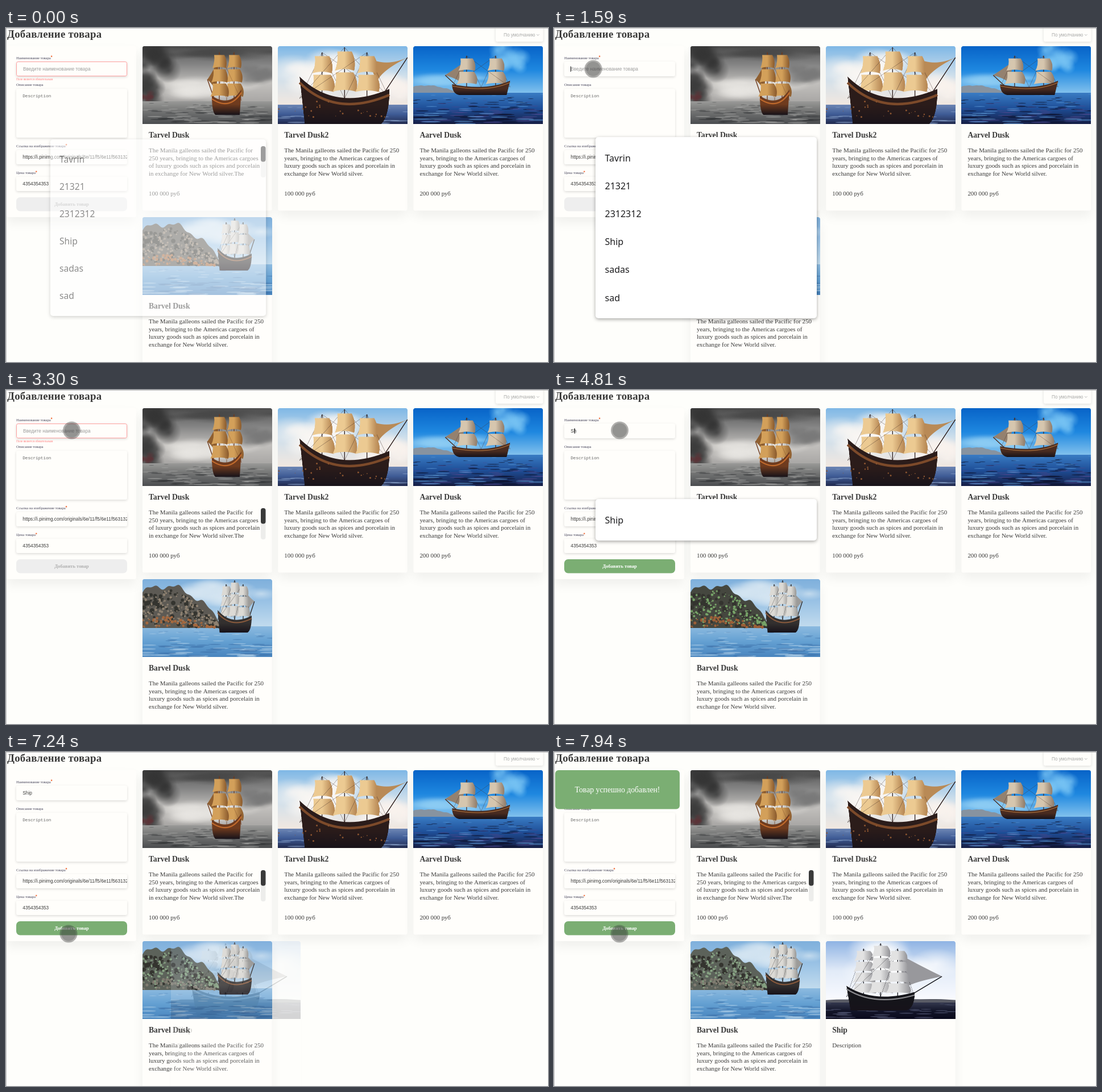
An HTML page with a canvas that plays this animation: 953 px wide and 588 px high, repeating every 8 s.

```html
<!DOCTYPE html>
<html lang="ru">
<head>
<meta charset="utf-8">
<title>Добавление товара</title>
<style>
html, body { margin: 0; width: 100%; height: 100%; overflow: hidden; background: #fefefb; }
canvas { display: block; }
</style>
</head>
<body>
<canvas id="stage" width="953" height="588"></canvas>
<script>
const W = 953, H = 588, LOOP = 8000, STEP = 100.5;
const SERIF = '"Liberation Serif", "Times New Roman", serif';
const SANS = '"Liberation Sans", Arial, sans-serif';
const MONO = '"Liberation Mono", monospace';
const UI = '"Noto Sans", "Open Sans", sans-serif';
const INK = '#3a3a3a', GREEN = '#7bae73', PAPER = '#fffefb';
const IMG_W = 227.5, IMG_H = 136.5;

const stage = document.getElementById('stage').getContext('2d');
const scratch = makeCanvas(W, H);
let g = stage;

const clamp = v => Math.max(0, Math.min(1, v));
const smooth = v => v * v * (3 - 2 * v);

// CSS "ease": cubic-bezier(.25, .1, .25, 1)
function ease(x) {
  if (x <= 0 || x >= 1) return clamp(x);
  let a = 0, b = 1, u = 0;
  for (let i = 0; i < 20; i++) {
    u = (a + b) / 2;
    const bx = .75 * u * (1 - u) ** 2 + .75 * u * u * (1 - u) + u ** 3;
    if (bx < x) a = u; else b = u;
  }
  return .3 * u * (1 - u) ** 2 + 3 * u * u * (1 - u) + u ** 3;
}

function random(seed) {
  return () => (seed = (seed * 16807) % 2147483647) / 2147483647;
}

// ---------- drawing helpers ----------
function makeCanvas(w, h) {
  const canvas = document.createElement('canvas');
  canvas.width = w;
  canvas.height = h;
  return canvas;
}

function drawInto(canvas, paint) {
  const outer = g;
  g = canvas.getContext('2d');
  g.save();
  g.clearRect(0, 0, canvas.width, canvas.height);
  paint();
  g.restore();
  g = outer;
}

// Fades a group of shapes as one.
function layer(alpha, paint) {
  if (alpha <= 0) return;
  drawInto(scratch, paint);
  g.globalAlpha = alpha;
  g.drawImage(scratch, 0, 0);
  g.globalAlpha = 1;
}

function text(s, x, y, font, color, spacing = 0, align = 'left') {
  g.font = font;
  g.fillStyle = color;
  g.letterSpacing = spacing + 'px';
  g.textAlign = align;
  g.fillText(s, x, y);
}

function box(x, y, w, h, r, color, shadow) {
  g.save();
  if (shadow) {
    [g.shadowOffsetY, g.shadowBlur] = shadow;
    g.shadowColor = `rgba(0,0,0,${shadow[2]})`;
  }
  g.fillStyle = color;
  g.beginPath();
  g.roundRect(x, y, w, h, r);
  g.fill();
  g.restore();
}

function disc(x, y, r, color) {
  g.fillStyle = color;
  g.beginPath();
  g.arc(x, y, r, 0, 7);
  g.fill();
}

function line(color, width, x0, y0, x1, y1) {
  g.strokeStyle = color;
  g.lineWidth = width;
  g.beginPath();
  g.moveTo(x0, y0);
  g.lineTo(x1, y1);
  g.stroke();
}

function gradient(x0, y0, x1, y1, colors) {
  const grad = g.createLinearGradient(x0, y0, x1, y1);
  colors.forEach((c, i) => grad.addColorStop(i / (colors.length - 1), c));
  return grad;
}

// ---------- pictures ----------
function band(y0, y1, ...colors) {
  g.fillStyle = gradient(0, y0, 0, y1, colors);
  g.fillRect(0, y0, IMG_W + 1, y1 - y0);
}

// Soft, flat puffs scattered around a point.
function cloud(rgb, x, y, rx, ry, seed) {
  const rnd = random(seed);
  for (let i = 0; i < 14; i++) {
    const px = x + (rnd() + rnd() - 1) * rx, py = y + (rnd() + rnd() - 1) * ry;
    const r = ry * (.4 + rnd() * .5);
    g.save();
    g.translate(px, py);
    g.scale(Math.max(1, rx / ry * .8), 1);
    const grad = g.createRadialGradient(0, 0, 0, 0, 0, r);
    grad.addColorStop(0, `rgba(${rgb},.7)`);
    grad.addColorStop(1, `rgba(${rgb},0)`);
    disc(0, 0, r, grad);
    g.restore();
  }
}

function waves(color, top, count, seed) {
  const rnd = random(seed);
  g.fillStyle = color;
  for (let i = 0; i < count; i++) {
    const depth = rnd(), x = rnd() * IMG_W;
    g.beginPath();
    g.ellipse(x, top + depth * (IMG_H - top), 4 + depth * 14, .4 + depth, 0, 0, 7);
    g.fill();
  }
}

const ridge = (u, wobble) => Math.sin(Math.PI * (.32 + .68 * u)) + wobble * Math.sin(u * 19) + wobble * .5 * Math.sin(u * 47);

function hill(color, width, base, height, wobble = .04) {
  g.fillStyle = color;
  g.beginPath();
  g.moveTo(0, base);
  for (let u = 0; u <= 1; u += .02) g.lineTo(u * width, base - height * Math.max(0, ridge(u, wobble)));
  g.lineTo(width, base);
  g.fill();
}

function foliage(color, count, width, base, height, size, seed) {
  const rnd = random(seed);
  for (let i = 0; i < count; i++) {
    const u = rnd();
    disc(u * width, base - rnd() * height * ridge(u, 0), size * (.4 + rnd()), color);
  }
}

function sail(x, y, w, h, belly) {
  g.beginPath();
  g.moveTo(x - w * .75, y);
  g.lineTo(x + w * .75, y);
  g.quadraticCurveTo(x + w + belly, y + h * .5, x + w, y + h);
  g.quadraticCurveTo(x, y + h * .82, x - w, y + h);
  g.quadraticCurveTo(x - w * .75 + belly * .5, y + h * .5, x - w * .75, y);
  g.fill();
}

// Stern at x0, bow at x1; the bow may point either way.
function ship(x0, x1, keel, deck, top, { masts, tiers, wide, hull, trim, lit, shade, jib = .3 }) {
  const len = x1 - x0, side = keel - deck, gap = Math.abs(len) * .5 / (masts - 1);
  const at = u => x0 + len * u;
  const tip = [at(1 + jib), deck - side * 1.5];
  const sheer = dy => {
    g.moveTo(at(0), deck - side * .8 + dy);
    g.quadraticCurveTo(at(.4), deck + side * .5 + dy, at(1), deck - side * .35 + dy);
  };
  const mastTop = i => top + (deck - top) * .1 * Math.abs(i - (masts - 1) / 2);
  const mastAt = i => at(.25 + .5 * i / (masts - 1));
  const front = masts - 1;

  line(hull, 1.4, at(.9), deck, ...tip);
  g.fillStyle = shade;
  g.beginPath();
  g.moveTo(mastAt(front), mastTop(front) + 8);
  g.quadraticCurveTo(at(.85 + jib * .5), top + (deck - top) * .4, ...tip);
  g.quadraticCurveTo(at(.9), deck - side, at(.86), deck - side * .6);
  g.fill();

  for (let i = 0; i < masts; i++) {
    const x = mastAt(i), y0 = mastTop(i);
    const rise = (deck - side * .15 - y0) / (tiers + .25);
    line(hull, 1.3, x, y0, x, deck + side * .3);
    for (const u of [0, .5, 1]) line(hull, .35, x, y0, at(u), deck);
    for (let j = 0; j < tiers; j++) {
      const w = gap * wide * (.65 + .35 * (j + 1) / tiers);
      g.fillStyle = gradient(x - w, 0, x + w, 0, [lit, lit, shade]);
      sail(x, y0 + rise * (j + .2), w, rise * .92, w * .25);
    }
  }

  g.fillStyle = gradient(0, deck - side * .5, 0, keel, [hull, hull, '#17131a']);
  g.beginPath();
  sheer(0);
  g.quadraticCurveTo(at(1), keel - side * .2, at(.88), keel);
  g.lineTo(at(.06), keel);
  g.fill();
  g.strokeStyle = trim;
  g.lineWidth = Math.max(1, side * .09);
  g.beginPath();
  sheer(side * .22);
  g.stroke();
}

function stormShip() {
  band(0, 98, '#555', '#858585', '#c2c0bd', '#a9a7a5');
  cloud('232,230,226', 100, 74, 80, 18, 7);
  cloud('70,70,70', 120, 6, 120, 16, 3);
  cloud('120,120,120', 200, 48, 40, 16, 15);
  cloud('52,52,52', 22, 22, 32, 28, 11);
  cloud('58,58,58', 16, 72, 24, 28, 19);
  cloud('92,50,54', 8, 90, 12, 8, 23);
  band(97, IMG_H, '#9a9a98', '#6f7070', '#4c4e50');
  waves('rgba(185,185,182,.45)', 99, 40, 5);
  waves('rgba(40,42,46,.45)', 99, 40, 9);
  ship(174, 122, 121, 96, 6, { masts: 2, tiers: 3, wide: .6, hull: '#6f3b1e', trim: '#c06a2c', lit: '#d3a05a', shade: '#8f5f30', jib: .15 });
}

function closeShip() {
  band(0, 104, '#7fb8e6', '#d0e0ec', '#f2e8e0');
  cloud('252,248,244', 80, 46, 80, 34, 5);
  cloud('250,243,238', 190, 72, 50, 24, 13);
  band(103, IMG_H, '#6d86b4', '#3f5c96', '#222c50');
  waves('rgba(150,175,215,.5)', 106, 30, 12);
  ship(38, 196, 140, 92, 2, { masts: 3, tiers: 2, wide: .52, hull: '#2b1c1a', trim: '#7c4a2a', lit: '#ecca92', shade: '#b98a56', jib: .2 });
  foliage('#8a5430', 26, 190, 125, 30, 1.1, 18);
}

function blueShip() {
  band(0, 84, '#0864c8', '#1f88e0', '#86c4ee');
  cloud('120,196,244', 168, 24, 26, 26, 6);
  cloud('140,204,244', 60, 62, 80, 12, 14);
  hill('#8793a0', 84, 84, 15);
  band(82, IMG_H, '#3a7cc4', '#1f4f98', '#161f48');
  waves('rgba(14,20,50,.7)', 90, 60, 21);
  waves('rgba(78,72,140,.55)', 96, 36, 27);
  waves('rgba(100,165,225,.5)', 84, 30, 33);
  ship(170, 68, 86, 72, 14, { masts: 2, tiers: 2, wide: .34, hull: '#4a2c20', trim: '#a06838', lit: '#d6c6ae', shade: '#94816f', jib: .12 });
}

function bayShip(rock, leaf, shore) {
  band(0, 84, '#7fb0dc', '#9cc4e6', '#c3dcee');
  cloud('214,230,242', 150, 30, 70, 22, 8);
  band(83, IMG_H, '#8dbbe0', '#64a0d2', '#4a86bf');
  waves('rgba(190,218,238,.5)', 88, 45, 41);
  waves('rgba(52,100,158,.45)', 92, 35, 47);
  hill(rock, 150, 86, 74, .06);
  foliage('#34342f', 120, 138, 84, 66, 3, 71);
  foliage(leaf, 170, 138, 82, 62, 1.7, 53);
  foliage(shore, 60, 130, 85, 20, 2, 59);
  ship(132, 192, 94, 72, 2, { masts: 3, tiers: 3, wide: .75, hull: '#33302f', trim: '#8a5a3c', lit: '#dcdad5', shade: '#9c9b99', jib: .08 });
}

function monoShip() {
  band(0, 104, '#8fb4e4', '#e2ebf8', '#fafbff');
  cloud('255,255,255', 120, 44, 80, 40, 4);
  hill('#5a5c66', 460, 114, 12);
  band(108, IMG_H, '#34384e', '#14162a', '#0a0a1c');
  waves('rgba(110,116,146,.45)', 110, 30, 61);
  ship(36, 156, 122, 98, 4, { masts: 3, tiers: 4, wide: .72, hull: '#15151a', trim: '#8c8c90', lit: '#e2e2e2', shade: '#98989c', jib: .4 });
}

function picture(scene, ...args) {
  const canvas = makeCanvas(IMG_W * 2, IMG_H * 2);
  drawInto(canvas, () => {
    g.scale(2, 2);
    g.beginPath();
    g.roundRect(0, 0, IMG_W, IMG_H, [3, 3, 0, 0]);
    g.clip();
    scene(...args);
  });
  return canvas;
}

// ---------- cards ----------
const BODY = `10.94px ${SERIF}`;
const BLURB = 'The Manila galleons sailed the Pacific for 250 years, bringing to the Americas cargoes of ' +
  'luxury goods such as spices and porcelain in exchange for New World silver.';

function wrap(s, width) {
  const lines = [];
  g.font = BODY;
  for (const word of s.split(' ')) {
    const longer = lines.length && lines[lines.length - 1] + ' ' + word;
    if (longer && g.measureText(longer).width <= width) lines[lines.length - 1] = longer;
    else lines.push(word);
  }
  return lines.slice(0, 4);
}

const short = wrap(BLURB, 205), long = wrap(BLURB + BLURB, 199);
const bays = [['#5d5a54', '#8f8271', '#a4683f'], ['#45473f', '#77a468', '#9c5f38'], ['#5c625a', '#86a182', '#7f7b70']]
  .map(tones => picture(bayShip, ...tones));
const cards = [
  { name: 'Tarvel Dusk', lines: long, price: '100 000 руб', art: picture(stormShip) },
  { name: 'Tarvel Dusk2', lines: short, price: '100 000 руб', art: picture(closeShip) },
  { name: 'Aarvel Dusk', lines: short, price: '200 000 руб', art: picture(blueShip) },
  { name: 'Barvel Dusk', lines: short, price: '', art: bays[0] },
  { name: 'Ship', lines: ['Description'], price: '', art: picture(monoShip) }
];

function card(i) {
  const { name, lines, price, art } = cards[i];
  const x = 240 + 238.2 * (i % 3), y = i < 3 ? 32 : 333;
  box(x, y, IMG_W, 289.5, 3, PAPER, [10, 20, .06]);
  g.drawImage(art, x, y, IMG_W, IMG_H);
  text(name, x + 11, y + 161.3, `bold 13.68px ${SERIF}`, INK);
  lines.forEach((s, n) => text(s, x + 11, y + 186.8 + n * 13.7, BODY, INK));
  text(price, x + 11, y + 263, BODY, INK);
}

// ---------- form ----------
const KEYS = [4310, 4810, 5010, 5310];
const FOCUS = [[1150, 2500], [3690, 6820]];

function label(s, y, required) {
  text(s, 18, y, `6.84px ${SERIF}`, '#49485e', -.13);
  if (required) disc(19.4 + g.measureText(s).width, y - 4.6, 1.3, '#f2794a');
}

function field(y, h) {
  box(18, y, 195, h, 2.7, PAPER, [1.4, 4, .14]);
}

function value(s, y, color = INK, x = 29.3) {
  g.save();
  g.beginPath();
  g.rect(18, y - 12, 195, 18);
  g.clip();
  text(s, x, y, `8.25px ${SANS}`, color);
  g.restore();
}

function nameField(t) {
  const focus = FOCUS.find(([a, b]) => t >= a && t < b);
  const pressed = KEYS.filter(k => t >= k);
  const typed = 'Ship'.slice(0, pressed.length);
  const error = !focus && !typed;

  label('Наименование товара', 54.5, true);
  field(59, 26);
  if (error) {
    g.strokeStyle = '#ffa0a0';
    g.lineWidth = 1;
    g.beginPath();
    g.roundRect(18.5, 59.5, 194, 25, 2.7);
    g.stroke();
    text('Поле является обязательным', 18, 92, `5.47px ${SERIF}`, '#ff8484', -.1);
  }
  if (typed) value(typed, 75);
  else value('Введите наименование товара', 75, '#9c9c9c', error ? 30 : 29.3);
  if (!focus) return;
  const blink = (t - Math.max(focus[0], ...pressed)) % 1000;
  const caret = typed ? g.measureText(typed).width : 0;
  if (blink < 500) box(Math.round(29 + caret), 67.5, 1, 9.5, 0, '#222');
}

function form(t) {
  box(1, 32, 228, 301, 3, PAPER, [10, 20, .06]);
  nameField(t);
  label('Описание товара', 102.3);
  field(107, 86);
  text('Description', 29.3, 121.5, `7.57px ${MONO}`, '#666');
  label('Ссылка на изображение товара', 210, true);
  field(215, 25);
  value('https://i.pinimg.com/originals/6e/11/f5/6e11f563132', 230);
  label('Цена товара', 257.3, true);
  field(261.5, 25.5);
  value('4354354353', 276.5);

  const ready = t >= 4400;
  box(18, 298, 195, 24.5, 6.8, ready ? GREEN : t >= 4310 ? '#b6cfb1' : '#eee');
  text('Добавить товар', 115.5, 313.2, `bold 8.5px ${SERIF}`, ready ? '#fff' : '#b0b0b0', 0, 'center');
}

function page(t) {
  g.fillStyle = '#fefefb';
  g.fillRect(0, 0, W, H);
  text('Добавление товара', 2, 16.5, `bold 18.8px ${SERIF}`, INK, .27);
  box(861, -8, 83.5, 32, 3, PAPER, [1.4, 5, .13]);
  text('По умолчанию', 875, 14.8, `8.2px ${SANS}`, '#a9aaa9');
  for (const side of [-1, 1]) line('#b4b4b4', .9, 935.3 + side * 2.3, 11, 935.3, 13.3);

  form(t);
  cards[3].art = bays[t < 4310 ? 0 : t < 6900 ? 1 : 2];
  for (let i = 0; i < 4; i++) card(i);
  box(448, 208, 8.5, 55, 4, '#ededeb');
  box(448, 208, 8.5, 27.5, 4, INK);

  g.fillStyle = '#c4c4c4';
  g.fillRect(0, 0, W, 1);
  g.fillRect(0, 0, 1, H);
}

// ---------- moving parts ----------
function newCard(t) {
  const p = t >= 7900 ? 1 : ease((t - 7095) / 1000);
  layer(p, () => {
    g.translate(-226 * (1 - p), 0);
    card(4);
  });
}

function toast(t) {
  const p = ease((t - 7300) / 600);
  layer(p, () => {
    g.translate(-219 * (1 - p), 0);
    box(2, 32, 219, 68.5, 6, GREEN);
    text('Товар успешно добавлен!', 111.5, 71, `13.75px ${SERIF}`, '#fff', 0, 'center');
  });
}

const SHOWN = [[-999, -100], [1090, 2450], [3610, 5310]];
const HINTS = ['Tavrin', '21321', '2312312', 'Ship', 'sadas', 'sad'];

function suggestions(t) {
  const span = SHOWN.find(([a, b]) => t > a && t < b + 200);
  if (!span) return;
  const alpha = Math.min(clamp((t - span[0]) / 200), clamp(1 - (t - span[1]) / 200));
  const items = t < 4310 ? HINTS : t < 4810 ? [...HINTS.slice(3), 'sada'] : ['Ship'];
  const h = 73 + 49.2 * (items.length - 1), k = .95 + .05 * alpha;
  layer(alpha, () => {
    g.translate(267.5, 192 + h / 2);
    g.scale(k, k);
    g.translate(-267.5, -192 - h / 2);
    box(73, 192, 389, h, 5, '#fff', [2, 6, .35]);
    items.forEach((s, i) => text(s, 89.5, 234.5 + i * 49.2, `500 16px ${UI}`, '#1d1d1f'));
  });
}

// start, end, x, y, sideways bend
const MOVES = [
  [100, 790, 62, 61], [990, 1290, 69, 72], [2100, 2450, 151, 52], [3100, 3300, 115.5, 71],
  [6020, 6420, 120, 314, 29], [6820, 7240, 110, 320], [7640, 7940, 115, 320]
];

function pointer(t) {
  if (t < MOVES[0][0]) return;
  let x = 855, y = 543;
  for (const [from, to, tx, ty, bend = 0] of MOVES) {
    const u = smooth(clamp((t - from) / (to - from)));
    x += (tx - x) * u + bend * Math.sin(Math.PI * u);
    y += (ty - y) * u;
  }
  disc(x, y, 15.5, 'rgba(60,60,60,.4)');
  disc(x, y, 12.8, 'rgba(60,60,60,.25)');
}

// The screen refreshes about ten times a second.
function draw(now) {
  const t = Math.floor((now % LOOP + 20) / STEP) * STEP;
  page(t);
  newCard(t);
  toast(t);
  suggestions(t);
  pointer(t);
}

const start = performance.now();
function tick() {
  draw(performance.now() - start);
  requestAnimationFrame(tick);
}
tick();
</script>
</body>
</html>
```
